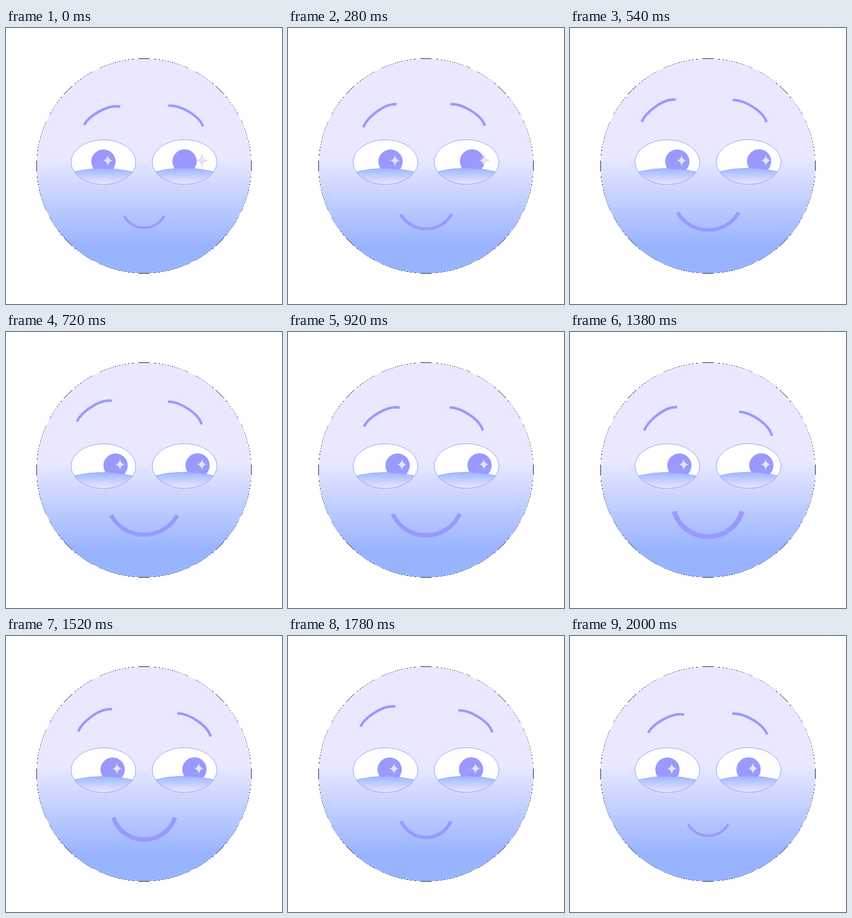
Animation, 500 px wide and 500 px high, one loop 2.02 s. Source, as an HTML page:

```html
<!DOCTYPE html>
<html lang="en">
<head>
<meta charset="utf-8">
<title>Glancing face</title>
<style>
  html, body { margin: 0; width: 100%; height: 100%; overflow: hidden; background: #fff; }
  svg { display: block; width: 100vw; height: 100vh; }

  .line { fill: none; stroke: #9999ff; }
  .brow { stroke-width: 4.6; }
  .pupil { fill: #9999ff; }
  .spark { fill: #e6e6fb; stroke: #a9a9ee; stroke-width: .5; }

  .pupil, .spark, .brow, .mouth {
    animation-duration: 2020ms;
    animation-timing-function: linear;
    animation-iteration-count: infinite;
  }

  .left { --look: 22px; }
  .right { --look: 23.5px; }
  .pupil, .left .spark { animation-name: look; }
  .right .spark { animation-name: look-back; }
  .brow.left { animation-name: left-path, left-tilt; }
  .brow.right { animation-name: right-path, right-tilt; }
  .mouth { animation-name: smile; }

  @keyframes look {
    0%, 99%, 100% { translate: 0 0; }
    33%, 67.8% { translate: var(--look) 0; }
  }
  /* this highlight waits at the far side for the pupil */
  @keyframes look-back {
    0%, 67.8% { translate: var(--look) 0; }
    99%, 100% { translate: 0 0; }
  }

  @keyframes left-path {
    0%, 49.5%, 99%, 100% { translate: 174.3px 159.5px; }
    9.9%, 59.4% { translate: 168.3px 160.5px; }
    19.8%, 68.3% { translate: 164.4px 158px; }
    26.7% { translate: 160.8px 150.5px; }
    75.2% { translate: 161.5px 153.5px; }
    80.2% { translate: 160px 147.5px; }
    34.7%, 84.2% { translate: 159.2px 142.8px; }
    88.1% { translate: 163px 146.5px; }
    45.5% { translate: 169.8px 154.5px; }
  }
  @keyframes left-tilt {
    0%, 49.5%, 99%, 100% { rotate: 0deg; }
    16.5%, 66% { rotate: -9.5deg; }
  }

  @keyframes right-path {
    0%, 99%, 100% { translate: 325.5px 160px; }
    19.8% { translate: 325.4px 157px; }
    26.7% { translate: 325.3px 151px; }
    34.7% { translate: 324px 146px; }
    45.5% { translate: 322.8px 158px; }
    49.5% { translate: 324px 160.5px; }
    59.4% { translate: 330.5px 166.5px; }
    67.3% { translate: 335.4px 167.5px; }
    75.2% { translate: 340.5px 161.8px; }
    84.2% { translate: 344.5px 151.5px; }
    88.1% { translate: 339.5px 155px; }
  }
  @keyframes right-tilt {
    0%, 99%, 100% { rotate: 0deg; }
    66% { rotate: 5.4deg; }
  }

  @keyframes smile {
    0%, 99%, 100% {
      d: path("M214 341 C230.1 369 270.3 369 286.4 341");
      stroke-width: 4.5px;
    }
    33% {
      d: path("M190.4 332.4 C217 378.4 283.6 378.4 310.2 332.4");
      stroke-width: 7px;
    }
    67.3% {
      d: path("M187.8 324.5 C206.4 386.5 294.1 386.5 312.7 324.5");
      stroke-width: 9px;
    }
  }
</style>
</head>
<body>
<svg viewBox="0 0 500 500">
  <defs>
    <linearGradient id="skin" gradientUnits="userSpaceOnUse" x1="0" y1="235" x2="0" y2="393">
      <stop offset="0" stop-color="#e9e8ff"/>
      <stop offset="1" stop-color="#99b4ff"/>
    </linearGradient>
    <linearGradient id="shade" gradientUnits="userSpaceOnUse" x1="0" y1="253" x2="0" y2="283">
      <stop offset="0" stop-color="#99b4ff"/>
      <stop offset="1" stop-color="#e9e8ff"/>
    </linearGradient>
    <ellipse id="oval" cx="176.5" cy="243" rx="58.6" ry="40.5"/>
    <clipPath id="inside"><use href="#oval"/></clipPath>
    <path id="lid" d="M124 260.3 Q176.3 248 228.6 260.3 V290 H124 Z"
          fill="url(#shade)" stroke="#9999ff" stroke-width=".7" clip-path="url(#inside)"/>
    <path id="star" d="M184.5 229.8 Q185.4 238.8 193.5 240.2 Q185.4 241.4 184.5 251 Q183.2 241.4 175.6 240.2 Q183.2 238.8 184.5 229.8 Z"/>
  </defs>

  <!-- hard-edged discs leave a broken dark rim -->
  <g shape-rendering="crispEdges">
    <circle cx="250" cy="250" r="194.75" fill="#222233"/>
    <circle cx="250" cy="250" r="194.45" fill="url(#skin)"/>
  </g>

  <g class="left">
    <use href="#oval" fill="#fff"/>
    <circle class="pupil" cx="176.5" cy="242" r="22"/>
    <use href="#lid"/>
    <use href="#oval" class="line"/>
    <use href="#star" class="spark"/>
  </g>
  <g class="right" transform="translate(147 -.3)">
    <use href="#oval" fill="#fff"/>
    <circle class="pupil" cx="176.5" cy="242" r="22"/>
    <use href="#lid"/>
    <use href="#oval" class="line"/>
    <use href="#star" class="spark"/>
  </g>

  <path class="line brow left" d="M-32.8 16 C-24 0 10 -22 32.7 -17"/>
  <path class="line brow right" d="M-31.5 -19.3 C-10 -21 25 -1 31.5 18.5"/>
  <path class="line mouth" d="M214 341 C230.1 369 270.3 369 286.4 341"/>
</svg>
</body>
</html>
```
